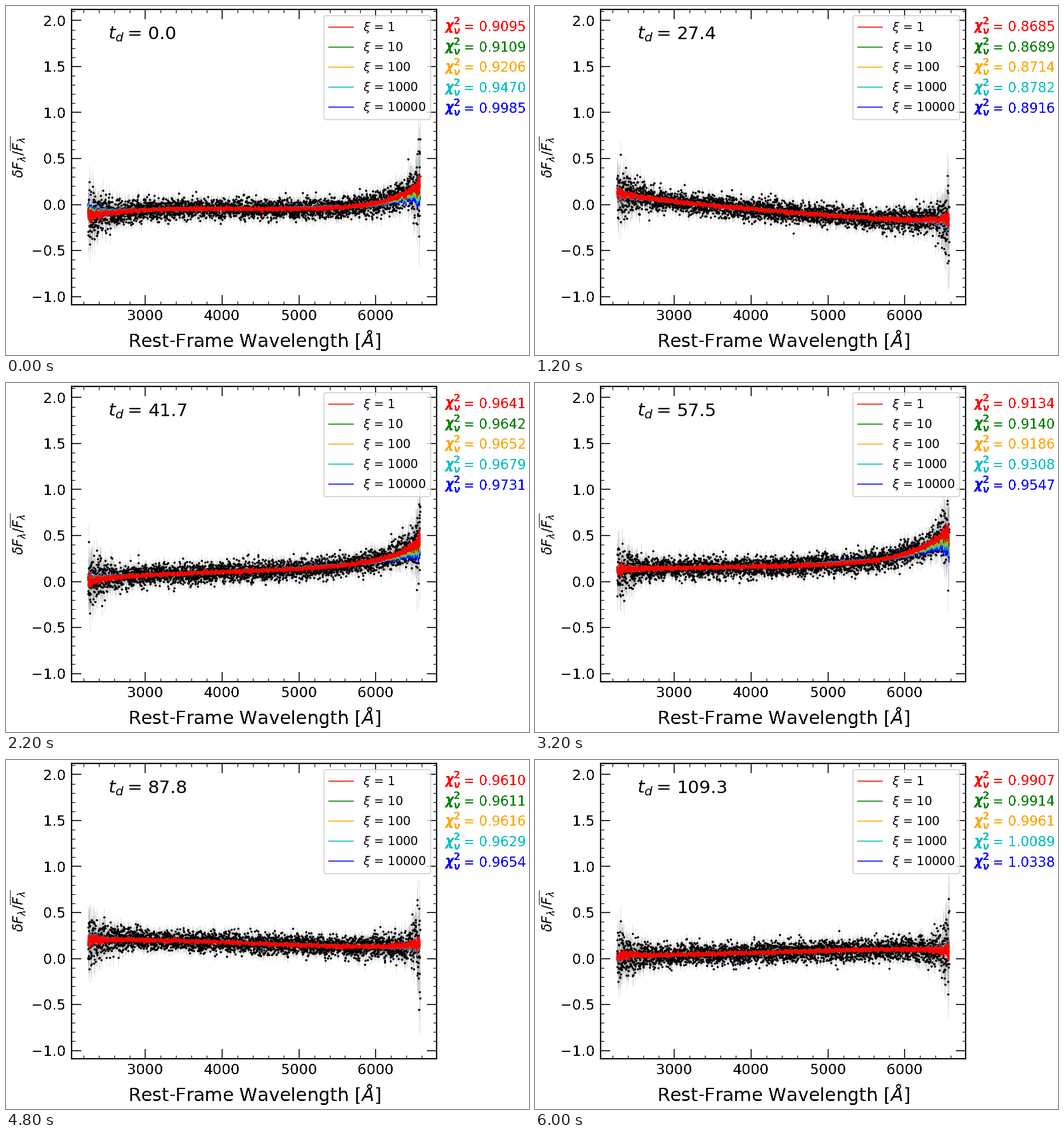
Recreate the animation shown at these times as a matplotlib script. Size 917 px wide and 611 px high, loop 6200 ms.

```python
import matplotlib.pyplot as plt
import numpy as np
from matplotlib.animation import FuncAnimation
from matplotlib.collections import LineCollection
from matplotlib.lines import Line2D
from matplotlib.patches import FancyBboxPatch
from matplotlib.ticker import MultipleLocator
from matplotlib.transforms import Affine2D

W, H, DPI = 917, 611, 100
FRAMES, STEP = 31, 200
LEFT, RIGHT, TOP, BOTTOM = 114.5, 755, 6, 523
XLIM, YLIM = (2039, 6791), (-1.09, 2.121)
LO, HI, POINTS = 2255, 6575, 3000

COLORS = ["red", "green", "orange", "c", "blue"]
STIFF = np.linspace(0, 1, len(COLORS))  # stiffness of each fit

# Key epochs; every quantity is linear in between.
KEYS = [0, 3, 8, 11, 16, 24, 30]
DELAY = [0.0, 14.5, 36.0, 41.7, 57.5, 87.8, 109.3]
LEVEL = [-.045, -.008, -.13, .115, .165, .165, .07]
TILT = [-.02, .012, -.12, .02, .01, -.035, .028]
BLUE_END = [-.13, -.03, .12, -.06, -.015, -.04, .03]
RED_END = [.30, -.12, .21, .27, .38, .07, -.05]
CHI2 = [.9095, .9557, .8104, .9641, .9134, .9610, .9907]
CHI2_RISE = [.0890, .0411, .0110, .0090, .0413, .0044, .0431]

wave = np.linspace(LO, HI, POINTS)
from_lo, from_hi = wave - LO, HI - wave
sigma = (0.055 + 0.12 * np.exp(-from_lo / 190)
         + 0.06 * np.exp(-from_hi / 300) + 0.19 * np.exp(-from_hi / 50))


def at(keys, i):
    return np.interp(i, KEYS, keys)


def fits(i):
    """One smooth model per colour; stiffer fits bend less at the ends."""
    lo, hi = at(BLUE_END, i), at(RED_END, i)
    base = (at(LEVEL, i) + at(TILT, i) * (wave - 4400) / 1000
            + lo * np.exp(-from_lo / 700) + hi * np.exp(-from_hi / 500))
    ends = lo * np.exp(-from_lo / 250) + hi * np.exp(-from_hi / 250)
    swell = 0.04 * hi * np.exp(-((wave - 5200) / 400) ** 2)
    return [base + s ** 1.5 * (swell - 0.5 * ends) for s in STIFF]


fig = plt.figure(figsize=(W / DPI, H / DPI), dpi=DPI, facecolor="white")
stage = Affine2D().scale(1 / W, -1 / H).translate(0, 1) + fig.transFigure


def place(x, y, s, px, color="black", smooth=False, **kw):
    """Text at stage pixels, hard-edged unless smooth."""
    kw.setdefault("va", "baseline")
    return fig.text(x, y, s, fontsize=px * 72 / DPI, color=color,
                    transform=stage, antialiased=smooth, **kw)


ax = fig.add_axes([LEFT / W, 1 - BOTTOM / H,
                   (RIGHT - LEFT) / W, (BOTTOM - TOP) / H])
ax.set(xlim=XLIM, ylim=YLIM)
for axis, major, minor in ((ax.xaxis, 1000, 200), (ax.yaxis, 0.5, 0.1)):
    axis.set_major_locator(MultipleLocator(major))
    axis.set_minor_locator(MultipleLocator(minor))
ax.tick_params(which="both", direction="in", top=True, right=True,
               labelbottom=False, labelleft=False)
ax.tick_params(which="major", length=12, width=1.2)
ax.tick_params(which="minor", length=4.5, width=0.9)
for spine in ax.spines.values():
    spine.set_linewidth(1.6)

for v in range(3000, 6001, 1000):
    x = LEFT + (v - XLIM[0]) / (XLIM[1] - XLIM[0]) * (RIGHT - LEFT)
    place(x, 550.5, str(v), 25, ha="center")
for v in np.arange(-1, 2.1, 0.5):
    y = BOTTOM - (v - YLIM[0]) / (YLIM[1] - YLIM[0]) * (BOTTOM - TOP)
    place(105, y + 9.2, f"{v:.1f}".replace("-", "\u2212"), 25, ha="right")
place(436, 597, r"Rest-Frame Wavelength [$\AA$]", 32, ha="center")
place(22, 264, r"$\delta F_{\lambda}/\overline{F_{\lambda}}$", 24,
      ha="center", va="center", rotation=90)

bars = LineCollection([], colors="gray", alpha=0.25, linewidths=0.7, zorder=1)
ax.add_collection(bars, autolim=False)
dots, = ax.plot([], [], "o", color="black", ms=2.8, mew=0, zorder=2)
curves = [ax.plot([], [], color=c, lw=1.4, zorder=8 - k)[0]
          for k, c in enumerate(COLORS)]

fig.add_artist(FancyBboxPatch(
    (557.5, 17), 187, 182, boxstyle="round,pad=0,rounding_size=4",
    fc="white", ec="0.8", alpha=0.8, lw=1.4, transform=stage))
scores = []
for k, c in enumerate(COLORS):
    y = 37 + 35.1 * k
    fig.add_artist(Line2D([565.5, 608.5], [y, y], color=c, lw=1.2,
                          transform=stage))
    place(625.5, y + 7, rf"$\xi$ = {10 ** k}", 21, smooth=True)
    y = 44 + 35.7 * k
    place(768, y, r"$\mathbfit{\chi}^{\mathbf{2}}_{\mathbfit{\nu}}$", 23.6, c)
    scores.append(place(801.5, y, "", 23.6, c))

place(179, 58, "$t_d =$", 31.25, smooth=True)
delay = place(249, 58, "", 31.25, smooth=True)


def update(i):
    rng = np.random.default_rng(100 + i)
    models = fits(i)
    flux = models[0] + sigma * rng.normal(size=POINTS)
    err = sigma * rng.uniform(0.9, 1.3, POINTS)
    bars.set_segments(np.stack([np.column_stack([wave, flux - err]),
                                np.column_stack([wave, flux + err])], axis=1))
    dots.set_data(wave, flux)
    jitter = 0.2 * sigma * rng.normal(size=POINTS)
    for curve, model in zip(curves, models):
        curve.set_data(wave, model + jitter)
    for score, s in zip(scores, STIFF):
        score.set_text(f"= {at(CHI2, i) + at(CHI2_RISE, i) * s ** 3:.4f}")
    delay.set_text(f"{at(DELAY, i):.1f}")
    return [bars, dots, *curves, *scores, delay]


anim = FuncAnimation(fig, update, frames=FRAMES, interval=STEP, repeat=True)
plt.show()
```
